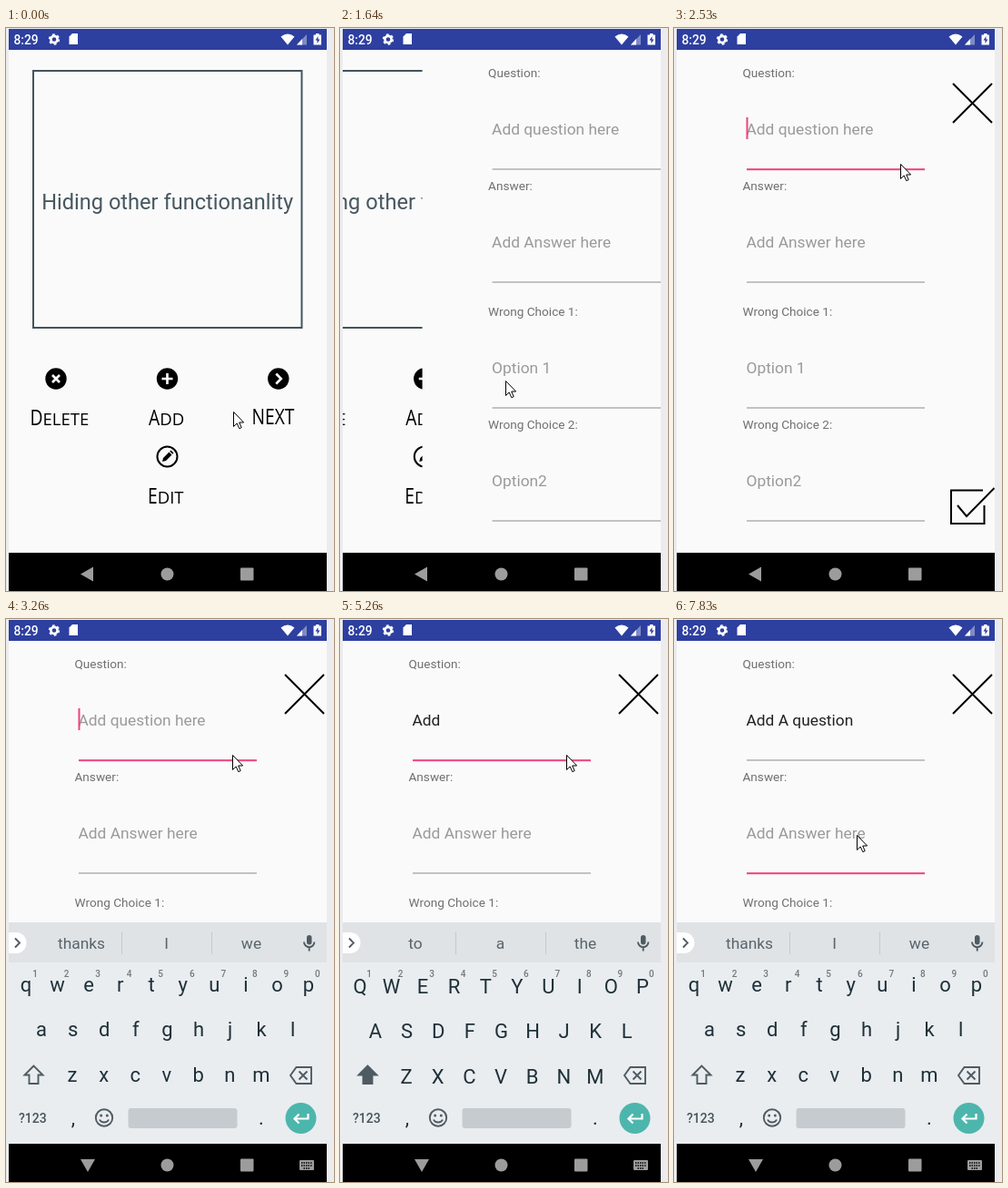
Recreate the animation shown at these times as an HTML page. Size 361x618 px, loop 8000 ms.

```html
<!DOCTYPE html>
<html lang="en">
<head>
<meta charset="utf-8">
<title>Flashcard app</title>
<style>
  html, body { margin: 0; width: 100%; height: 100%; overflow: hidden; background: #ececee; }
  svg { display: block; width: 361px; height: 618px; font-family: Roboto, sans-serif; }
  text { white-space: pre; }
  .mid { text-anchor: middle; }
  .line { fill: none; stroke: #000; stroke-width: 2; }
  .caps { font-family: "Open Sans", "Noto Sans", sans-serif; }
  .label { font-size: 13.6px; fill: #707070; }
  .field { font-size: 17.35px; fill: #9a9a9a; }
  .typed { fill: #212121; }
  .key { font-size: 22px; fill: #1f3038; text-anchor: middle; }
  .digit { font-size: 10px; font-weight: 500; fill: #6f7a80; text-anchor: middle; }
  .word { font-size: 17.4px; fill: #58656c; text-anchor: middle; }
  .icon { fill: none; stroke: #4f5b62; stroke-width: 1.9; }
</style>
</head>
<body>
<svg id="stage" viewBox="0 0 361 618"></svg>
<script>
const LOOP = 8000, PINK = "#f0417f";
const stage = document.getElementById("stage");

// Label face: narrow capitals followed by regular small capitals.
const caps = (x, y, big, small = "") => {
  const pen = document.createElement("canvas").getContext("2d");
  pen.font = '24px "Open Sans", "Noto Sans", sans-serif';
  const after = pen.measureText(big).width * 0.8;
  return `<g class="caps" transform="translate(${x} ${y})">
    <text font-size="24" transform="scale(.8 1)">${big}</text>
    <text font-size="18.5" x="${after}">${small}</text></g>`;
};

const disc = (x, mark) => `<g transform="translate(${x} 385)"><circle r="11.7"/>
  <path d="${mark}" fill="none" stroke="#fff" stroke-width="2.6"/></g>`;

const card = `
  <rect x="30" y="47" width="295.5" height="282" fill="none" stroke="#43545c" stroke-width="2"/>
  <text class="mid" x="177.7" y="198.8" font-size="23.6" fill="#47575f">Hiding other functionanlity</text>
  ${disc(55, "M-4-4L4 4M4-4L-4 4")}
  ${disc(177.5, "M-6 0H6M0-6V6")}
  ${disc(299.8, "M-2.5-5.5L3 0L-2.5 5.5")}
  <circle class="line" cx="177.5" cy="470.5" r="11"/>
  <path d="M172 476l1-4 6.500-6.500 3 3-6.500 6.500zM180.300 464.700l1.200-1.200 3 3-1.200 1.200z"/>
  ${caps(26.5, 436, "D", "ELETE")}
  ${caps(157, 436, "A", "DD")}
  ${caps(270.5, 435, "NEXT")}
  ${caps(156, 521.5, "E", "DIT")}`;

const fields = [
  [54, "Question:", "Add question here"],
  [178, "Answer:", "Add Answer here"],
  [316, "Wrong Choice 1:", "Option 1"],
  [440, "Wrong Choice 2:", "Option2"]
];

const form = `<rect x="3" y="24" width="350" height="552" fill="#fafafa"/>` +
  fields.map(([y, label, hint], i) => `
    <text class="label" x="75.500" y="${y}">${label}</text>
    <text class="field" id="field${i}" x="79.500" y="${y + 63}">${hint}</text>
    <rect id="rule${i}" x="80" y="${y + 100.5}" width="196" height="1" fill="#8c8c8c"/>`).join("") + `
  <rect id="under" y="118" height="1" fill="#212121"/>
  <rect id="caret" width="2" height="24" fill="${PINK}"/>
  <path class="line" d="M307 61L350 104M350 61L307 104"/>
  <path class="line" d="M340 507.500H305V544H341.500V524M312 524L322 536L352.500 505"/>`;

const rows = [
  ["qwertyuiop", 22, 34.55, 409],
  ["asdfghjkl", 39, 34.6, 458],
  ["zxcvbnm", 73, 34.65, 507.5]
];

const letters = rows.map(([row, x, step, y]) => [...row].map((c, i) =>
  `<text class="key letter" x="${x + i * step}" data-y="${y}">${c}</text>`).join("")).join("");
const digits = [..."1234567890"].map((c, i) =>
  `<text class="digit" x="${32 + i * 34.55}" y="393">${c}</text>`).join("");
const words = [83, 176.5, 270].map(x =>
  `<g transform="translate(${x} 362)"><text class="word"></text></g>`).join("");

const keyboard = `
  <rect x="3" y="333" width="350" height="244" fill="#e9edf0"/>
  <rect x="3" y="333" width="350" height="44" fill="#dfe3e6"/>
  <path d="M3 344H11A11.500 11.500 0 0 1 11 367H3z" fill="#fff"/>
  <path class="icon" d="M10 350.500L15 355.500L10 360.500" stroke-width="2.2"/>
  <path d="M127.500 344V368M226.500 344V368" stroke="#c3c9cd"/>
  ${words}
  <rect x="331" y="347" width="5.500" height="10.500" rx="2.750" fill="#4f5b62"/>
  <path class="icon" d="M328 354.500a5.700 5.700 0 0 0 11.400 0M333.700 360V364.500" stroke-width="1.600"/>
  ${digits}${letters}
  <path id="shift" class="icon" d="M30.500 490.500L20.500 500.500H25.500V510H35.500V500.500H40.500z"/>
  <path class="icon" d="M319.500 492H336V510H319.500L313 501zM322.500 496.500L331.500 505.500M331.500 496.500L322.500 505.500"/>
  <text x="14" y="553" font-size="14" font-weight="500" fill="#46545b">?123</text>
  <text class="key" x="74" y="555">,</text>
  <text class="key" x="281" y="555">.</text>
  <circle class="icon" cx="108" cy="547.500" r="9.200"/>
  <path class="icon" d="M103 549.500a5.300 4.600 0 0 0 10 0"/>
  <circle cx="104.700" cy="545" r="1.500" fill="#4f5b62"/><circle cx="111.300" cy="545" r="1.500" fill="#4f5b62"/>
  <rect x="134.500" y="537" width="120" height="22" rx="3" fill="#c6cbcf"/>
  <circle cx="324.500" cy="548" r="17" fill="#4db6ac"/>
  <path d="M332.500 543V548.500H318M322.500 543.500L317.500 548.500L322.500 553.500" fill="none" stroke="#fff" stroke-width="2.200"/>`;

const statusBar = `
  <rect x="3" y="1" width="350" height="23" fill="#2d3f9f"/>
  <g fill="#fff">
    <text x="8.500" y="17.500" font-size="13.800" font-weight="500">8:29</text>
    <path d="M73 6H79V18H69.500V9.500z"/>
    <path d="M302.500 9.500Q310 3.500 317.500 9.500L310 18.500z"/>
    <path d="M331 7V18.500H320z" opacity=".4"/><path d="M326 12V18.500H320z"/>
    <path d="M341 6H344.500V7.500H347V18.500H338.500V7.500H341z"/>
  </g>
  <path d="M343.500 9L340.500 13.500H342.500V17L345.500 12.500H343.500z" fill="#2d3f9f"/>
  <g fill="none" stroke="#fff"><circle cx="53" cy="12.500" r="3.600" stroke-width="2.600"/>
    <circle cx="53" cy="12.500" r="5.200" stroke-width="2" stroke-dasharray="2.720"/></g>`;

const navBar = `
  <rect x="3" y="576" width="350" height="42"/>
  <g fill="#9c9c9c">
    <path id="back" d="M82 599.500L96 591.500V607.500z"/>
    <path id="down" d="M82 593H98L90 607z"/>
    <circle cx="177.500" cy="599.500" r="7"/>
    <rect x="258" y="592.500" width="14.500" height="14" rx="1"/>
    <g id="picker"><rect x="323" y="594" width="16" height="11" rx="1"/>
      <path d="M325 597H337M325 600H337M327.500 603H334.500" stroke="#000" stroke-width="1.300" stroke-dasharray="1.500 1"/></g>
  </g>`;

stage.innerHTML = `
  <clipPath id="screen"><rect x="3" y="0" width="350" height="618"/></clipPath>
  <g clip-path="url(#screen)">
    <rect x="3" y="24" width="350" height="552" fill="#fafafa"/>
    <g id="card">${card}</g>
    <g id="form">${form}</g>
    <g id="keyboard">${keyboard}</g>
    ${statusBar}${navBar}
  </g>
  <path id="mouse" d="M.5 .5V16.500L4.200 13L6.800 18.700L9.200 17.600L6.700 12H11.600z" fill="#fff" stroke="#000"/>`;

const $ = id => document.getElementById(id);
const set = (el, attrs) => { for (const k in attrs) el.setAttribute(k, attrs[k]); };
const show = (el, on) => set(el, { visibility: on ? "visible" : "hidden" });
const clamp = v => Math.min(1, Math.max(0, v));
const within = (t, spans) => spans.some(([a, b]) => t >= a && t < b);

// time, x, y of the pointer
const path = [
  [80, 250, 421], [360, 286, 408], [600, 264, 380], [880, 206, 387], [920, 206, 387],
  [1050, 182, 387], [2330, 182, 387], [2490, 249, 149], [6960, 249, 149], [7230, 201, 237]
];

// time, typed text, shift, suggestions
const typing = [
  [0, "", 0, "thanks I we"],
  [4060, "", 1, "thanks I we"],
  [4180, "A", 0, "A And As"],
  [4280, "Ad", 0, "Ad Add As"],
  [4380, "Add", 0, "Add Added Address"],
  [4560, "Add ", 0, "Add Added Address"],
  [4590, "Add ", 0, "to a the"],
  [5260, "Add ", 1, "to a the"],
  [5350, "Add A", 0, "to a the"],
  [5400, "Add A", 0, "A And As"],
  [5550, "Add A ", 0, "new few lot"],
  [5680, "Add A q", 0, "q quick quite"],
  [5780, "Add A qu", 0, "qu quick quite"],
  [5880, "Add A que", 0, "que question quest"],
  [6060, "Add A ques", 0, "ques question quest"],
  [6130, "Add A quest", 0, "quest question quests"],
  [6180, "Add A questi", 0, "questi question questions"],
  [6230, "Add A questio", 0, "questio question questions"],
  [6290, "Add A question", 0, "question questionnaire questions"],
  [7400, "Add A question", 0, "thanks I we"]
];

const FOCUS = 2510, SWITCH = 7330, KEYS_IN = 2580;
const caretOn = [[FOCUS, 2760], [3260, 3790], [4060, 5050], [5350, 6780], [7280, 7830]];

const ruler = document.createElement("canvas").getContext("2d");
const width = s => {
  ruler.font = "17.35px Roboto, sans-serif";
  return ruler.measureText(s).width;
};

function pointer(t) {
  const i = path.findIndex(p => p[0] > t);
  if (i < 1) return (i ? path[path.length - 1] : path[0]).slice(1);
  const a = path[i - 1], b = path[i];
  const p = (t - a[0]) / (b[0] - a[0]), k = p * p * (3 - 2 * p);
  return [a[1] + (b[1] - a[1]) * k, a[2] + (b[2] - a[2]) * k];
}

function drawForm(t, text) {
  const active = t < FOCUS ? -1 : t < SWITCH ? 0 : 1;
  fields.forEach(([y], i) => set($("rule" + i), {
    y: y + (i === active ? 100.2 : 100.5),
    height: i === active ? 2 : 1,
    fill: i === active ? PINK : "#8c8c8c"
  }));
  $("field0").textContent = text || fields[0][2];
  $("field0").classList.toggle("typed", text !== "");

  const start = text.lastIndexOf(" ") + 1;
  set($("under"), { x: 79.5 + width(text.slice(0, start)), width: width(text.slice(start)) });
  show($("under"), text.length > start && t < SWITCH);
  set($("caret"), active === 1 ? { x: 79.5, y: 222 } : { x: 79.5 + width(text), y: 98 });
  show($("caret"), within(t, caretOn));
}

function drawKeys(t, upper, hints) {
  const p = clamp((t - KEYS_IN) / 220), k = 1 - (1 - p) ** 3;
  set($("keyboard"), { transform: `translate(0 ${(1 - k) * 60})`, opacity: clamp(p * 2) });
  show($("back"), !p);
  show($("down"), p);
  show($("picker"), p);
  document.querySelectorAll(".letter").forEach(el => {
    const c = el.textContent;
    el.textContent = upper ? c.toUpperCase() : c.toLowerCase();
    set(el, { y: +el.dataset.y + (upper ? 2 : 0) });
  });
  $("shift").style.fill = upper ? "#4f5b62" : "none";
  const list = hints.split(" ");
  // A suggestion wider than its cell is condensed.
  document.querySelectorAll(".word").forEach((el, i) => {
    if (el.textContent === list[i]) return;
    el.textContent = list[i];
    set(el, { transform: `scale(${Math.min(1, 86 / el.getComputedTextLength())} 1)` });
  });
}

function draw(t) {
  const slide = clamp((t - 1520) / 500);
  set($("card"), { transform: `translate(${-350 * slide} 0)` });
  set($("form"), { transform: `translate(${350 * (1 - slide) ** 5} 0)` });
  const [, text, upper, hints] = typing.filter(s => s[0] <= t).pop();
  drawForm(t, text);
  drawKeys(t, upper, hints);
  set($("mouse"), { transform: `translate(${pointer(t).map(Math.round).join(" ")})` });
}

const began = performance.now();
function tick() {
  draw((performance.now() - began) % LOOP);
  requestAnimationFrame(tick);
}
tick();
</script>
</body>
</html>
```
